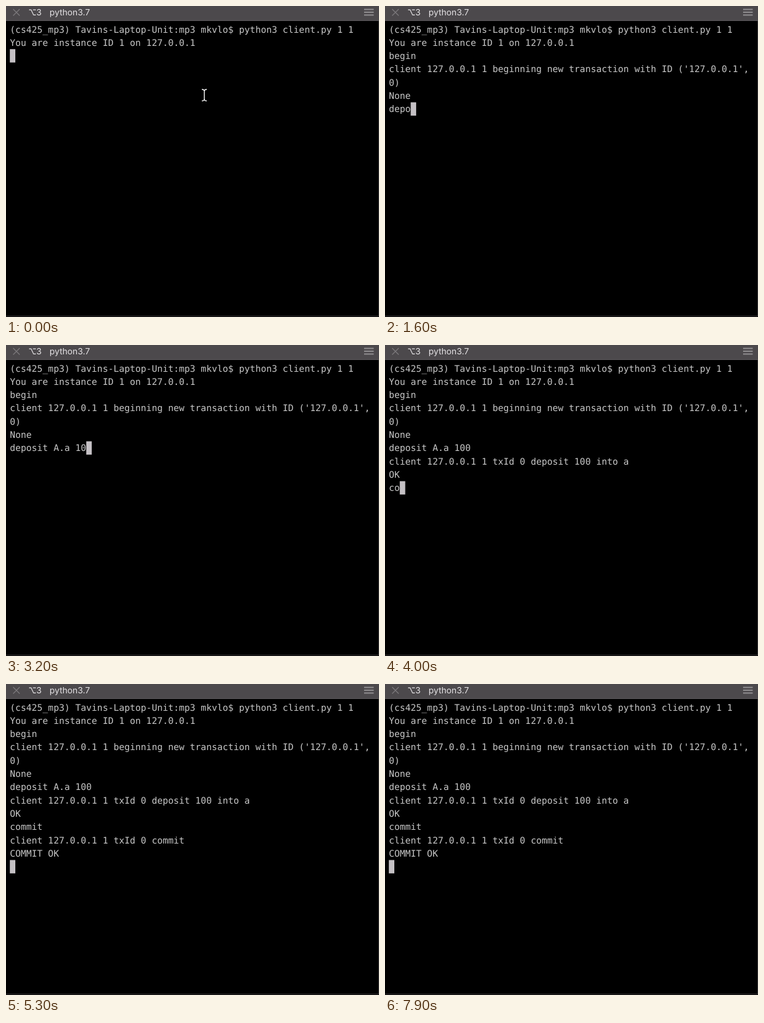
These frames come from a looping animation (600 px wide and 499 px high, 8000 ms). An HTML page:

```html
<!DOCTYPE html>
<html lang="en">
<head>
<meta charset="utf-8">
<title>Terminal</title>
<style>
  html, body { margin: 0; width: 100%; height: 100%; overflow: hidden; background: #000; }
  #stage { position: relative; width: 600px; height: 499px; overflow: hidden; }
  svg { position: absolute; inset: 0; }
  #tab { font: 13.8px Inter, sans-serif; fill: #e4e2e4; text-rendering: geometricPrecision; }
  #screen {
    position: absolute; left: 6.2px; top: 27.5px; margin: 0; color: #c7c7c7;
    font: 14.58px/21.32px "DejaVu Sans Mono", monospace;
    text-rendering: geometricPrecision; font-variant-ligatures: none;
  }
</style>
</head>
<body>
<div id="stage">
  <svg width="600" height="499" fill="none">
    <path fill="#4c494c" d="M0 0h600v23H0z"/>
    <path fill="#5c595c" d="M0 23h600v1H0z"/>
    <path fill="#383638" d="M0 497h600v1H0zM599 24h1v473h-1z"/>
    <path stroke="#7d7a7d" stroke-width="1.2" d="M11.5 5l10.5 10.5M22 5L11.5 15.5"/>
    <path stroke="#e4e2e4" stroke-width="1.2" d="M37 6.2h3.4l4 8.2H48M43.4 6.2H48"/>
    <path stroke="#8f8d8f" stroke-width="1.8" d="M576 5.5h15.5M576 10h15.5M576 14.5h15.5"/>
    <g id="tab"><text x="48.8" y="15">3</text><text x="70" y="15">python3.7</text></g>
    <path id="pointer" stroke="#eee" stroke-width="1.5"
      d="M315 133.7q4 0 4 3.3q0-3.3 4-3.3M319 136.5v13M315 152.3q4 0 4-3.3q0 3.3 4 3.3"/>
    <rect id="caret" width="8.8" height="21.4" fill="#c5c1c5"/>
  </svg>
  <pre id="screen"></pre>
</div>
<script>
const LOOP = 8000, COL = 8.78, ROW = 21.32, LEFT = 6.2, TOP = 26.6;
const PROMPT = "(cs425_mp3) Tavins-Laptop-Unit:mp3 mkvlo$ python3 client.py 1 1\n" +
  "You are instance ID 1 on 127.0.0.1\n";

// [time, output]; "\b" erases one character
const events = [
  [0, PROMPT],
  [200, "b"], [300, "e"], [400, "g"], [500, "i"], [600, "n"],
  [900, "\nclient 127.0.0.1 1 beginning new transaction with ID ('127.0.0.1',\n0)\nNone\n"],
  [1300, "d"], [1400, "e"], [1600, "po"], [1800, "s"], [1900, "it"], [2000, " "],
  [2600, "A"], [2800, ".a"], [3000, " "], [3100, "1"], [3200, "0"], [3300, "0"],
  [3600, "\nclient 127.0.0.1 1 txId 0 deposit 100 into a\nOK\n"],
  [4000, "co"], [4200, "m"], [4400, "m"], [4600, "it"],
  [5300, "\nclient 127.0.0.1 1 txId 0 commit\nCOMMIT OK\n"],
  [7400, "b"], [7900, "\b"]
];

const [screen, caret, pointer] = ["screen", "caret", "pointer"].map(id => document.getElementById(id));

function textAt(time) {
  return events.filter(([start]) => start <= time)
    .reduce((text, [, out]) => out === "\b" ? text.slice(0, -1) : text + out, "");
}

function draw(now) {
  const time = now % LOOP;
  const text = textAt(time);
  if (screen.textContent !== text) screen.textContent = text;
  const lines = text.split("\n");
  caret.setAttribute("x", LEFT + lines.at(-1).length * COL);
  caret.setAttribute("y", TOP + (lines.length - 1) * ROW);
  pointer.style.display = time < 200 ? "" : "none";
  requestAnimationFrame(draw);
}
draw(0);
</script>
</body>
</html>
```
